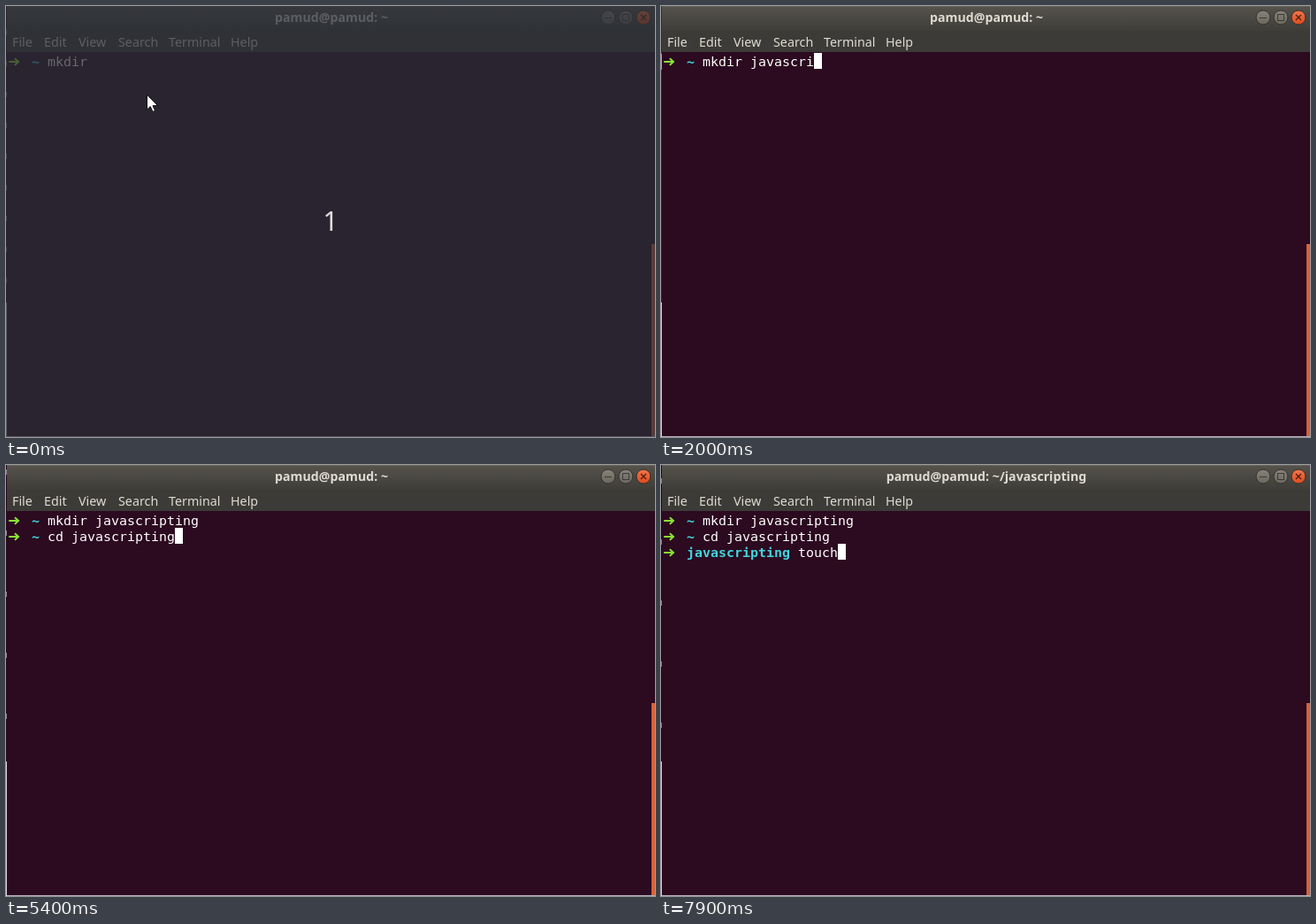
An HTML page with a canvas for the animation above (8 s loop, 734 px wide and 487 px high).

```html
<!DOCTYPE html>
<html lang="en">
<head>
<meta charset="utf-8">
<title>Terminal</title>
<style>
html, body { margin: 0; width: 100%; height: 100%; overflow: hidden; background: #2c0a20; }
canvas { display: block; }
</style>
</head>
<body>
<canvas id="stage" width="734" height="487"></canvas>
<script>
const W = 734, H = 487, LOOP = 8000;
const CELL = 9, ROW = 18, LEFT = 2, TOP = 53;
const UI = '"Noto Sans", "Open Sans", sans-serif';
const MONO = '14.95px "DejaVu Sans Mono", monospace';
const USER = 'pamud';
const DIR = 'javascripting';
const GREEN = '#8ae234', CYAN = '#40d5dd', WHITE = '#ffffff';
const c = document.getElementById('stage').getContext('2d');

// Bursts of keys: start, keys, ms per key (0 = all at once). '>' prints a prompt.
const KEYS = [
  [-600, '>mkdir ', 0], [400, 'ja', 100], [700, 'va', 200], [1300, 's', 0],
  [1700, 'cri', 150], [2400, 'p', 0], [2700, 'ti', 100], [3100, 'ng', 100], [3600, '\n>', 100],
  [4100, 'cd', 0], [4300, ' ja', 150], [4900, 'va', 100], [5400, 'scripting', 0], [5500, '\n>', 100],
  [6900, 'tou', 200], [7700, 'ch', 0]
];

function typeUntil(t) {
  let out = '', last = 0;
  for (const [start, keys, pace] of KEYS) {
    if (t < start) break;
    const n = pace ? Math.min(keys.length, 1 + Math.floor((t - start) / pace)) : keys.length;
    out += keys.slice(0, n);
    last = start + (n - 1) * pace;
  }
  return { lines: out.split('\n'), idle: t - last };
}

function rect(x, y, w, h, color) {
  c.fillStyle = color;
  c.fillRect(x, y, w, h);
}

function text(s, x, y, font, color, align = 'left') {
  c.font = font;
  c.fillStyle = color;
  c.textAlign = align;
  c.fillText(s, x, y);
}

function path(points) {
  c.beginPath();
  for (const [x, y] of points) c.lineTo(x, y);
}

function stroke(points, color, width, cap = 'butt') {
  path(points);
  c.strokeStyle = color;
  c.lineWidth = width;
  c.lineCap = cap;
  c.stroke();
}

function fade(y0, y1, from, to) {
  const g = c.createLinearGradient(0, y0, 0, y1);
  g.addColorStop(0, from);
  g.addColorStop(1, to);
  return g;
}

function button(x, from, to) {
  c.beginPath();
  c.arc(x, 13, 8, 0, 7);
  c.fillStyle = fade(5, 21, from, to);
  c.fill();
  c.strokeStyle = '#34322d';
  c.lineWidth = 1;
  c.stroke();
}

function drawFrame(title) {
  rect(0, 0, W, H, '#2c0a20');
  rect(0, 0, W, 28, fade(0, 28, '#56534c', '#3e3d38'));
  rect(0, 28, W, 24, '#3c3b37');
  rect(0, 0, W, 1, '#66635b');
  text(title, 368, 18, 'bold 14.2px ' + UI, '#dfdbd2', 'center');

  button(681, '#87837a', '#6a665d');
  button(701, '#87837a', '#6a665d');
  button(721, '#f2744a', '#df4b1e');
  stroke([[677, 13.5], [685, 13.5]], '#3c3b37', 1);
  c.strokeRect(697.5, 9.5, 7, 7);
  stroke([[718, 10], [724, 16]], '#4b2014', 1.3);
  stroke([[724, 10], [718, 16]], '#4b2014', 1.3);

  const menu = { File: 7, Edit: 43, View: 82, Search: 127, Terminal: 184, Help: 254 };
  for (const name in menu) text(name, menu[name], 46, '14.3px ' + UI, '#dfdbd2');

  rect(730, 269, 4, 218, '#d4633c');
  rect(0, 486, W, 1, '#b5adb7');
}

// One pixel of the window behind, whose text lines scroll past
function drawEdge(t) {
  const blue = t >= 200 && t < 2400;
  rect(0, 0, 1, 335, blue ? '#20305c' : '#260a1e');
  rect(0, 335, 1, 152, '#d9d5df');
  if (blue) {
    rect(0, t < 400 ? 4 : 54, 1, 18, '#a9aaa8');
    return;
  }
  const still = t < 3600;
  const gap = still ? 35 : 69;
  const first = still ? 30 : (Math.floor(t / 350) * 31 + 26) % gap;
  for (let y = first; y < 330; y += gap) rect(0, y - 3, 1, 6, '#8f848d');
}

function drawPrompt(row, place) {
  const y = TOP + row * ROW + 10;
  stroke([[4, y], [13.5, y]], GREEN, 2, 'round');
  stroke([[10.5, y - 3.3], [14, y], [10.5, y + 3.3]], GREEN, 2, 'round');
  text(place, LEFT + 3 * CELL, y + 5, 'bold ' + MONO, CYAN);
}

function drawShell(lines, cursorOn) {
  lines.forEach((line, row) => {
    const place = row < 2 ? '~' : DIR;
    const prompt = line[0] === '>';
    const command = line.slice(1);
    const col = prompt ? 4 + place.length : 0;
    const x = LEFT + col * CELL, y = TOP + row * ROW;
    if (prompt) drawPrompt(row, place);
    text(command, x, y + 15, MONO, WHITE);
    if (cursorOn && row === lines.length - 1) rect(x + command.length * CELL, y, CELL, ROW, WHITE);
  });
}

function drawCountdown() {
  rect(0, 0, W, H, 'rgba(42, 46, 54, 0.72)');
  text('1', 367, 254, '30px ' + UI, '#dedede', 'center');
  path([[159.5, 100.5], [159.5, 117], [163.3, 113.6], [166, 119.5],
    [168.6, 118.3], [166, 112.7], [171, 112.3]]);
  c.closePath();
  c.fillStyle = WHITE;
  c.fill();
  c.strokeStyle = '#111';
  c.lineWidth = 1;
  c.stroke();
}

function drawBeam() {
  const ink = '#dcebdc';
  rect(161, 97, 1, 12, ink);
  rect(159, 96, 5, 1, ink);
  rect(159, 109, 5, 1, ink);
}

function draw(t) {
  const { lines, idle } = typeUntil(t);
  drawFrame(USER + '@' + USER + ': ~' + (lines.length > 2 ? '/' + DIR : ''));
  drawEdge(t);
  drawShell(lines, idle % 1100 < 600);
  if (t < 200) drawCountdown();
  else if (t < 400) drawBeam();
}

const start = performance.now();
function tick() {
  draw((performance.now() - start) % LOOP);
  requestAnimationFrame(tick);
}
tick();
</script>
</body>
</html>
```
